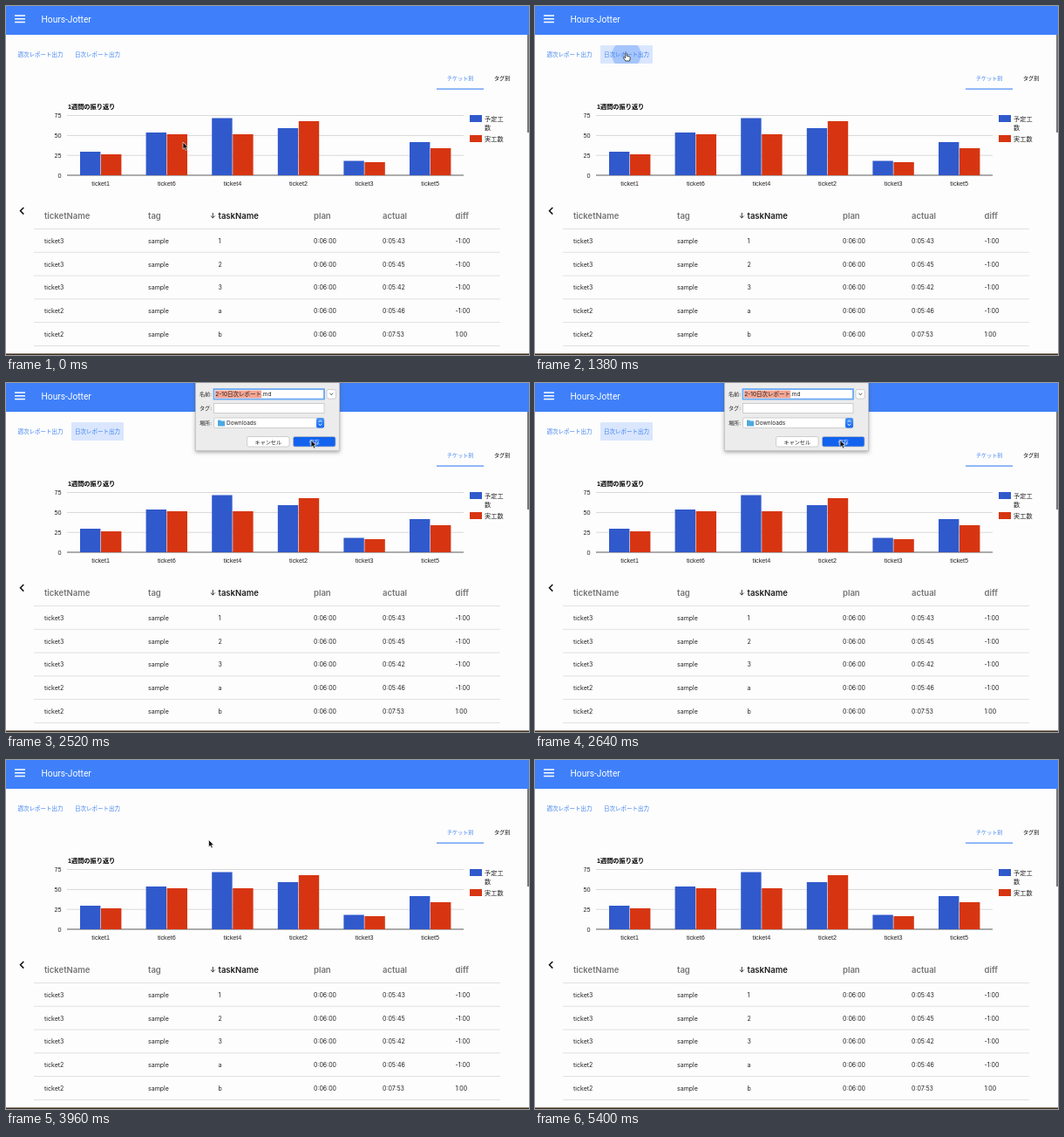
An HTML page for the animation above (5520 ms loop, 600 by 400 pixels).

```html
<!DOCTYPE html>
<html lang="ja">
<head>
<meta charset="utf-8">
<title>Hours-Jotter</title>
<style>
  html, body { margin: 0; width: 100%; height: 100%; overflow: hidden; background: #fdfdfd; }
  svg { display: block; width: 600px; height: 400px; font: 7px Inter, "Noto Sans CJK JP", sans-serif; }
  .title { font: 10.2px Roboto, sans-serif; fill: #fff; }
  .jp { font: 6.5px "Noto Sans CJK JP", sans-serif; }
  .small { font-size: 6.1px; }
  .chart { font: 7.2px "Liberation Sans", "Noto Sans CJK JP", sans-serif; fill: #222; }
  .bold { font-weight: 700; fill: #000; }
  .head { font-size: 9.5px; font-weight: 600; fill: #757575; }
  .sorted { fill: #1c1c1c; }
  .cell { fill: #222; }
  .link { fill: #3d80f2; }
  .mid { text-anchor: middle; }
  .end { text-anchor: end; }
</style>
</head>
<body>
<svg viewBox="0 0 600 400">
  <defs>
    <clipPath id="buttonClip"><rect x="75" y="45" width="60" height="21" rx="1"/></clipPath>
    <filter id="shadow" x="-10%" y="-10%" width="120%" height="130%">
      <feDropShadow dx="0" dy="1.5" stdDeviation="2" flood-color="#444" flood-opacity=".5"/>
    </filter>
    <linearGradient id="accent" x2="0" y2="1">
      <stop stop-color="#4c98f6"/><stop offset="1" stop-color="#1468f0"/>
    </linearGradient>
  </defs>

  <g id="page"></g>

  <g id="hover" clip-path="url(#buttonClip)">
    <rect x="75" y="45" width="60" height="21" fill="#d9e6fd"/>
    <circle id="ripple" cx="105" cy="56" fill="#4a8af5"/>
  </g>
  <text class="jp link" x="79" y="58">日次レポート出力</text>

  <g id="dialog">
    <rect x="217.5" y="-6" width="165" height="83.5" fill="#ececec" stroke="#bdbdbd" stroke-width=".7" filter="url(#shadow)"/>
    <g fill="#fff" stroke="#bdbdbd" stroke-width=".7">
      <rect id="nameField" x="238.5" y="7" width="126.5" height="11.5"/>
      <rect x="238.5" y="23.5" width="126.5" height="11"/>
      <rect x="238.5" y="40" width="126.5" height="11.5" rx="2"/>
      <rect x="368" y="7.5" width="10.5" height="10.5" rx="2"/>
      <rect x="276.5" y="61.5" width="48.5" height="11.5" rx="2"/>
      <rect id="save" x="329.5" y="61.5" width="48.5" height="11.5" rx="2"/>
    </g>
    <rect id="selection" x="240" y="8.5" width="53" height="8.8"/>
    <rect id="stepper" x="356" y="40" width="9" height="11.5" rx="2" fill="url(#accent)"/>
    <path d="M371.5 11.7l1.8 2 1.8-2" fill="none" stroke="#444" stroke-width=".9"/>
    <path id="stepArrows" d="M358.8 44.8l1.7-2 1.7 2M358.8 46.8l1.7 2 1.7-2" fill="none" stroke-width=".9"/>
    <path d="M243 42.5h3l1 1h4v6h-8z" fill="#4da9e0"/>
    <g class="jp small" fill="#222">
      <text x="222" y="15">名前:</text>
      <text x="222" y="31.2">タグ:</text>
      <text x="222" y="48">場所:</text>
      <text x="240.3" y="15.2" style="font:6.5px Inter,'Noto Sans CJK JP',sans-serif">2-10日次レポート.md</text>
      <text x="253" y="48.2" style="font:6.5px Inter,sans-serif">Downloads</text>
      <text class="mid" x="300.8" y="69.5">キャンセル</text>
      <text class="mid" id="saveText" x="353.8" y="69.5">保存</text>
    </g>
  </g>

  <g id="cursor" stroke="#fff" stroke-width=".6">
    <path id="arrow" d="M0 0V8.2L1.9 6.5 3.2 9.4 4.7 8.7 3.4 5.9H6z" fill="#111"/>
    <path id="hand" d="M-.8 .2Q0 -.9 .8 .2V3.2L4 4Q5 4.3 4.7 6L4 9H-.6L-3 5.6Q-3.2 4.3 -2 4.7L-.8 5.7z" fill="#fff" stroke="#222" stroke-width=".8"/>
  </g>
</svg>
<script>
const LOOP = 5520, STEP = 60;
const $ = id => document.getElementById(id);

const rect = (x, y, w, h, fill) => `<rect x="${x}" y="${y}" width="${w}" height="${h}" fill="${fill}"/>`;
const text = (cls, x, y, s) => `<text class="${cls}" x="${x}" y="${y}">${s}</text>`;
const stroke = (d, color, width) => `<path d="${d}" fill="none" stroke="${color}" stroke-width="${width}"/>`;

function buildPage() {
  const blue = "#3059cb", red = "#d73512";
  let out = rect(0, 0, 600, 33, "#3f80fa") + stroke("M10 11h12M10 14.8h12M10 18.5h12", "#fff", 1.5)
    + text("title", 40.6, 19.3, "Hours-Jotter")
    + text("jp link", 13.5, 58, "週次レポート出力")
    + text("jp small link", 506, 84.5, "チケット別") + text("jp small", 560, 84.5, "タグ別")
    + rect(494, 94.5, 54, 1.2, "#4a8af5")
    + text("chart bold", 71, 117.5, "1週間の振り返り");

  [75, 50, 25, 0].forEach((value, i) => {
    const y = 125.5 + i * 22.83;
    out += rect(70, y - .4, 455, .8, value ? "#d0d0d0" : "#333") + text("chart end", 63.5, y + 2.6, value);
  });
  const bars = [[1, 27, 24], [6, 49, 47], [4, 65.5, 47], [2, 54, 62], [3, 16.5, 15], [5, 38, 31]];
  bars.forEach(([ticket, plan, actual], i) => {
    const x = 85 + i * 75.6;
    out += rect(x, 194 - plan, 23.4, plan, blue) + rect(x + 24, 194 - actual, 23.4, actual, red)
      + text("chart mid", x + 23.7, 206, "ticket" + ticket);
  });
  out += rect(532, 125, 14, 8, blue) + rect(532, 148, 14, 8, red)
    + text("chart", 549, 132, "予定工") + text("chart", 549, 142, "数") + text("chart", 549, 155, "実工数");

  const columns = [44, 163, 243.5, 353, 432, 515.5];
  ["ticketName", "tag", "taskName", "plan", "actual", "diff"].forEach((name, i) =>
    out += text(i == 2 ? "head sorted" : "head", columns[i], 243.6, name));
  const rows = [[3, 1, "0:05:43", "-1:00"], [3, 2, "0:05:45", "-1:00"], [3, 3, "0:05:42", "-1:00"],
    [2, "a", "0:05:46", "-1:00"], [2, "b", "0:07:53", "1:00"]];
  rows.forEach(([ticket, task, actual, diff], r) => {
    ["ticket" + ticket, "sample", task, "0:06:00", actual, diff].forEach((cell, i) =>
      out += text("cell", columns[i], 271.7 + r * 26.8, cell));
  });
  for (let r = 0; r < 6; r++) out += rect(32, 255 + r * 26.8, 535, .9, "#dedee2");

  return out + stroke("M237.3 237v5.8M234.9 240.5l2.4 2.4 2.4-2.4", "#222", .9)
    + stroke("M20.3 231l-3.8 3.8 3.8 3.8", "#111", 1.5)
    + rect(598, 33, 2, 112, "#777") + rect(0, 398.4, 600, 1.6, "#43301f");
}
$("page").innerHTML = buildPage();

const progress = (t, from, to) => Math.min(1, Math.max(0, (t - from) / (to - from)));
const smooth = p => p * p * (3 - 2 * p);
const show = (id, on) => $(id).style.display = on ? "" : "none";

// time, x, y
const path = [[0, 203, 156], [180, 203, 156], [1020, 108, 59], [1260, 104.5, 54], [1860, 104.5, 54],
  [2400, 350, 65.5], [3060, 350, 65.5], [3240, 306.5, 78], [3960, 232.5, 91.5], [4140, 225, 93],
  [4860, 221, 94], [5280, 400, -14], [LOOP, 400, -14]];

function cursorAt(t) {
  const i = path.findIndex(k => k[0] > t);
  const [t0, x0, y0] = path[i - 1], [t1, x1, y1] = path[i];
  const p = smooth(progress(t, t0, t1));
  return [x0 + (x1 - x0) * p, y0 + (y1 - y0) * p];
}

function draw(t) {
  const [x, y] = cursorAt(t);
  const onButton = t < 2200 && x > 75 && x < 135 && y < 66;
  $("cursor").setAttribute("transform", `translate(${x} ${y})`);
  show("hand", onButton);
  show("arrow", !onButton);

  show("hover", onButton || t > 1260 && t < 2940);
  const grow = progress(t, 1290, 1650);
  $("ripple").setAttribute("r", 45 * (1 - (1 - grow) ** 1.6));
  $("ripple").setAttribute("opacity", .36 * (1 - progress(t, 1400, 1660)));

  const open = 1 - (1 - progress(t, 1420, 1760)) ** 2;
  const close = progress(t, 2640, 2900) ** 2;
  show("dialog", open > 0 && close < 1);
  $("dialog").setAttribute("transform", `translate(0 ${-84 * (1 - open + close)})`);

  const active = t >= 1740, pressed = t >= 2460;
  $("nameField").setAttribute("stroke", active ? "#6aaaf2" : "#bdbdbd");
  $("nameField").setAttribute("stroke-width", active ? 1.8 : .7);
  $("selection").setAttribute("fill", active ? "#f4a593" : "#d6d6d6");
  show("stepper", active);
  $("stepArrows").setAttribute("stroke", active ? "#fff" : "#444");
  $("save").setAttribute("fill", !active ? "#fff" : pressed ? "#1262ee" : "url(#accent)");
  $("saveText").setAttribute("fill", active ? "#fff" : "#222");
}

const start = performance.now();
function tick() {
  const t = (performance.now() - start) % LOOP;
  draw(Math.floor(t / STEP) * STEP);
  requestAnimationFrame(tick);
}
tick();
</script>
</body>
</html>
```
